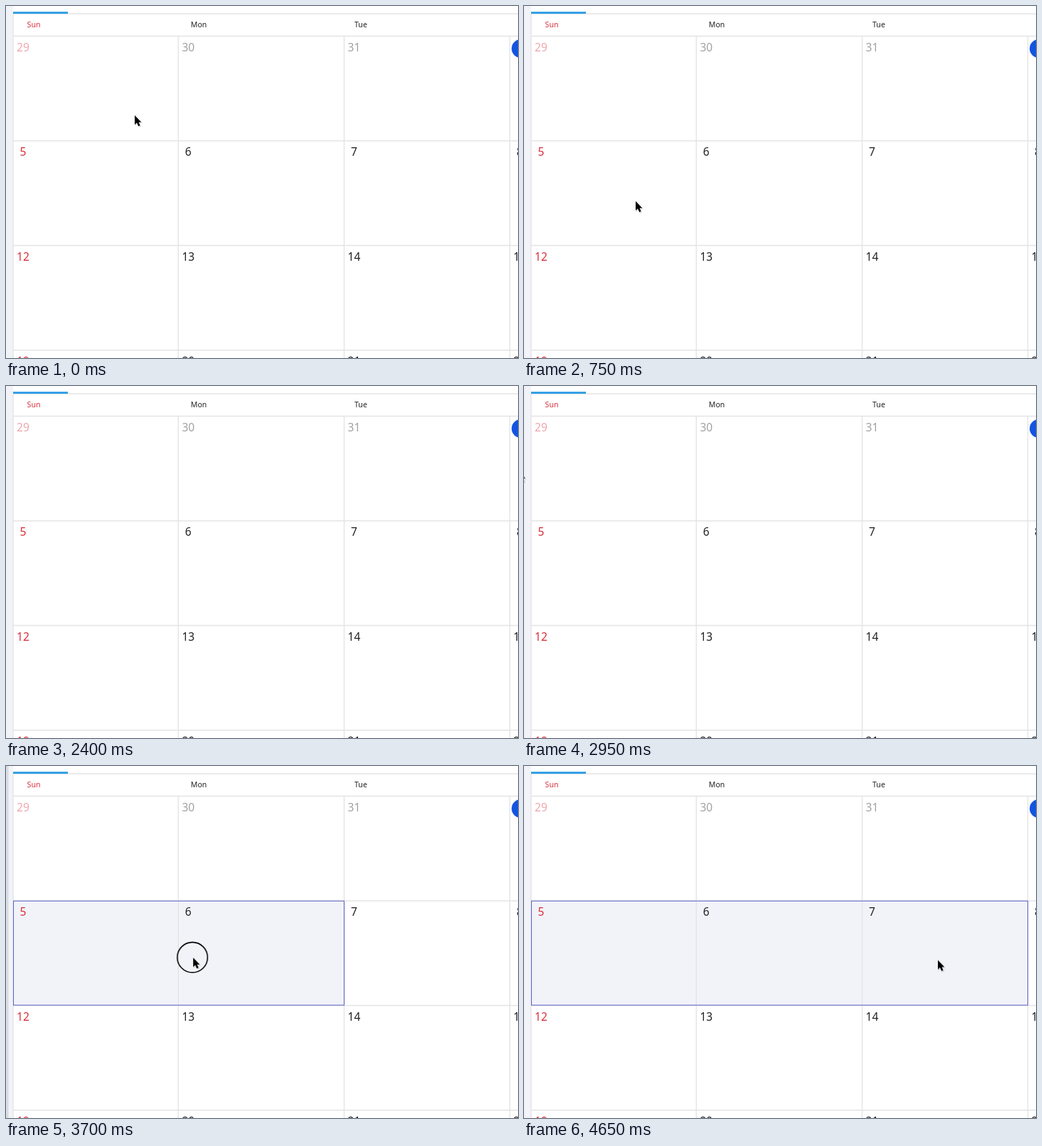
An HTML page for the animation above (5200 ms loop, 720x496 px).

```html
<!DOCTYPE html>
<html lang="en">
<head>
<meta charset="utf-8">
<title>Calendar range selection</title>
<style>
  html, body { margin: 0; width: 100%; height: 100%; overflow: hidden; background: #fff; }
  svg { display: block; width: 720px; height: 496px; }
  text { font-family: "Noto Sans", "Open Sans", sans-serif; fill: #222; }
  .head { font-size: 10.6px; }
  .date { font-size: 15.6px; text-anchor: middle; }
  .sun { fill: #d8303c; }
  .dim { opacity: .42; }
  .line { stroke: #e4e4e6; stroke-width: 1.4; }
</style>
</head>
<body>
<svg viewBox="0 0 720 496">
  <rect width="10" height="496" fill="#f2f3f8"/>
  <rect id="edge" width="3.5" height="496" fill="#c2c8ce" opacity="0"/>
  <rect id="fill" x="10.5" y="190.2" width="0" height="146.8" fill="#f2f3f9"/>
  <g id="grid"></g>
  <rect x="10" y="8" width="77" height="3" fill="#35a0e6"/>
  <circle cx="724" cy="60" r="13" fill="#1455df"/>
  <g id="labels"></g>
  <rect id="outline" x="10.5" y="190.2" width="0" height="146.8" fill="none" stroke="#5a60c6"/>
  <g id="pointer">
    <circle id="ring" cx="-1" cy="-.3" r="21.3" fill="none" stroke="#000" stroke-width="1.6" opacity="0"/>
    <path d="M1 1V15L4.2 12.3L6.4 17L9.3 15.7L7.2 11.2H11Z" fill="#000" opacity=".16"/>
    <path d="M0 0V13.2L3 10.6L5.2 15.4L7.6 14.3L5.5 9.7H9.4Z" fill="#000" stroke="#fff" stroke-width="1.1" paint-order="stroke"/>
  </g>
</svg>
<script>
const LOOP = 5200;
const columns = [10, 242.3, 475.5, 708.5];
const rows = [42.5, 190, 337.5, 485];
const get = id => document.getElementById(id);

function add(parent, tag, attributes, content = "") {
  const node = document.createElementNS("http://www.w3.org/2000/svg", tag);
  for (const [name, value] of Object.entries(attributes)) node.setAttribute(name, value);
  node.textContent = content;
  get(parent).append(node);
}

const line = (x1, y1, x2, y2) => add("grid", "line", { x1, y1, x2, y2, class: "line" });
line(10, 11, 720, 11);
rows.forEach(y => line(10, y, 720, y));
columns.forEach((x, i) => line(x, i ? 42.5 : 11, x, 496));

["Sun", "Mon", "Tue"].forEach((day, i) =>
  add("labels", "text", { x: 29.6 + 230.2 * i, y: 29.8, class: i ? "head" : "head sun" }, day));

rows.forEach((top, row) => columns.forEach((left, column) => {
  const day = row * 7 + column - 2;
  if (day === 1) return;
  const style = "date" + (column ? "" : " sun") + (day < 1 ? " dim" : "");
  add("labels", "text", { x: left + 14, y: top + 21.4, class: style }, day < 1 ? day + 31 : day);
}));

// Each step is [milliseconds, value, easing to the next step].
function play(id, property, steps) {
  const frames = steps.map(([time, value, easing = "linear"]) =>
    ({ offset: time / LOOP, [property]: value, easing }));
  frames.push({ offset: 1, [property]: steps.at(-1)[1] });
  get(id).animate(frames, { duration: LOOP, iterations: Infinity });
}

const at = (x, y) => `translate(${x}px, ${y}px)`;
const HOLD = "step-end";

play("pointer", "transform", [
  [0, at(181, 154), "ease-in-out"],
  [550, at(152, 268), "ease-out"],
  [750, at(157, 275), "ease-in-out"],
  [1150, at(208, 274), HOLD],
  [2950, at(-8, 120), "ease-out"],
  [3250, at(96, 153), "ease-in-out"],
  [3450, at(122, 270), HOLD],
  [3550, at(122, 270), "ease-in"],
  [3700, at(262, 270)],
  [3900, at(499, 269), "ease-out"],
  [4100, at(582, 273.5)]
]);
play("pointer", "opacity", [[0, 1, HOLD], [2400, 0, HOLD], [2950, 1, HOLD]]);
play("ring", "opacity", [
  [0, 0, HOLD], [1250, 1, HOLD], [1450, 0, HOLD],
  [3500, 1, HOLD], [4300, .5, HOLD], [4400, 0, HOLD]
]);
play("edge", "opacity", [[0, 0], [2950, 0], [3050, 1], [3250, 1], [3900, .3], [4000, 0]]);

const spans = [
  [0, "0px", HOLD], [3600, "232px", HOLD], [3700, "465px", HOLD], [3950, "698px", HOLD]
];
play("fill", "width", spans);
play("outline", "width", spans);
play("outline", "opacity", [[0, 0, HOLD], [3600, 1, HOLD]]);
</script>
</body>
</html>
```
